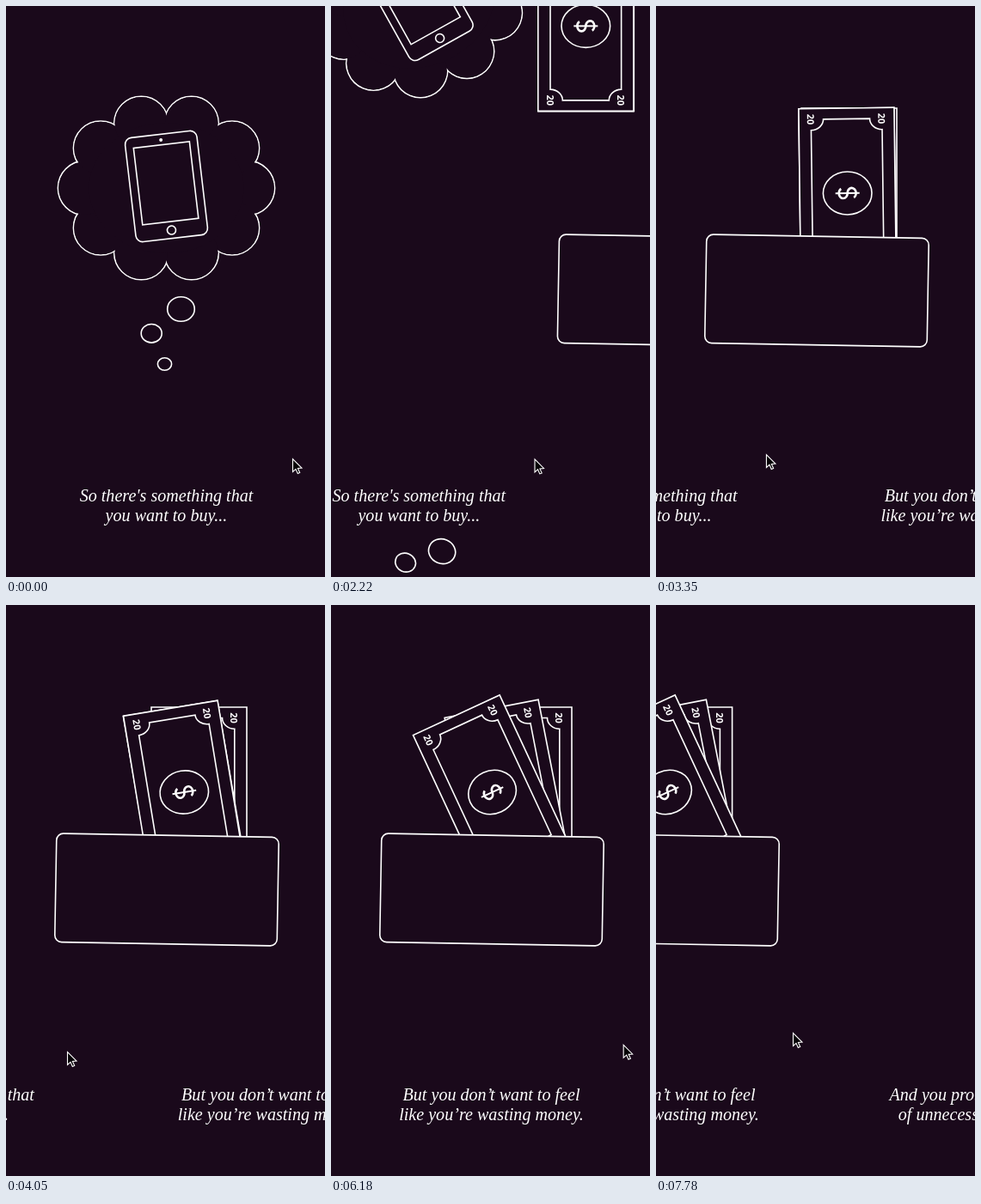
Animation, 371 px wide and 665 px high, one loop 8 s. Source, as an HTML page with a canvas:

```html
<!DOCTYPE html>
<html lang="en">
<head>
<meta charset="utf-8">
<title>Onboarding swipe</title>
<style>
html, body { margin: 0; width: 100%; height: 100%; overflow: hidden; background: #1a091b; }
canvas { display: block; width: 371px; height: 665px; }
</style>
</head>
<body>
<canvas id="stage"></canvas>
<script>
const W = 371, H = 665, LOOP = 8000, PAGE = 375, HALF = PAGE / 2, MID = 186.5;
const BG = '#1a091b', INK = '#fff', TAU = Math.PI * 2, DEG = Math.PI / 180;
const SPIN = 0.267; // degrees per scrolled pixel
const RELEASE = 4045, SNAP = 470, SECOND_DRAG = 6160;

const canvas = document.getElementById('stage');
const dpr = window.devicePixelRatio || 1;
canvas.width = W * dpr;
canvas.height = H * dpr;
const c = canvas.getContext('2d');

// Pointer strokes; the pointer rests between them
const REST = { x: 333, y: 527 };
const STROKES = [
  { from: 930, to: 1610, x: 269.6, y: 528 },
  { from: 1610, to: 2600, x: 216, y: 527 },
  { from: 2670, to: 3350, x: 128, y: 522 },
  { from: 3350, to: 4030, x: 71, y: 520 },
  { from: 4700, to: 5600, x: 342, y: 512 },
  { from: 6160, to: 6800, x: 271, y: 507 },
  { from: 6920, to: 7780, x: 159, y: 498 }
];

const PAGES = [
  ["So there's something that", 'you want to buy...'],
  ['But you don\u2019t want to feel', 'like you\u2019re wasting money.'],
  ['And you probably have a ton', 'of unnecessary expenses...']
];

const ARROW = new Path2D('M0 0V15L3.5 11.8L5.8 17L8.2 16L5.9 11L10.5 10.6Z');

const clamp = (v, a, b) => Math.min(b, Math.max(a, v));
const mix = (a, b, u) => a + (b - a) * u;
const smooth = u => u * u * (3 - 2 * u);

function pointer(t) {
  let { x, y } = REST;
  for (const s of STROKES) {
    const u = clamp((t - s.from) / (s.to - s.from), 0, 1);
    x = mix(x, s.x, s.x > x ? smooth(u) : u);
    y = mix(y, s.y, u);
  }
  return { x, y };
}

// Drags follow the pointer past a small threshold, then the page snaps
function scrollAt(t) {
  if (t >= SECOND_DRAG) return PAGE + Math.max(0, 333 - pointer(t).x);
  const drag = Math.max(0, 320.7 - pointer(Math.min(t, RELEASE)).x);
  const u = clamp((t - RELEASE) / SNAP, 0, 1);
  return mix(drag, PAGE, 1 - (1 - u) ** 3);
}

function at(x, y, angle, draw) {
  c.save();
  c.translate(x, y);
  c.rotate(angle * DEG);
  draw();
  c.restore();
}

function oval(x, y, rx, ry = rx) {
  c.beginPath();
  c.ellipse(x, y, rx, ry, 0, 0, TAU);
}

function box(w, h, r, y = 0) {
  c.beginPath();
  c.roundRect(-w / 2, y - h / 2, w, h, r);
}

function lobes(r) {
  for (let a = 0; a < 360; a += 36) {
    oval(94.5 * Math.cos(a * DEG), 79 * Math.sin(a * DEG), r);
    r > 31 ? c.stroke() : c.fill();
  }
}

function phone() {
  box(84, 122, 8);
  c.stroke();
  box(65.5, 90, 0, -3.6);
  c.stroke();
  oval(0, 51.4, 5);
  c.stroke();
  c.fillStyle = INK;
  oval(0, -54.4, 2);
  c.fill();
}

function cloud(s) {
  at(MID - s, 212 - 0.0307 * s * s, -SPIN * s, () => {
    lobes(31.6);
    lobes(30.8);
    oval(0, 0, 90, 76);
    c.fill();
    at(0, -2, -6.7, phone);
  });
}

function bubbles(s) {
  const bubble = (x, y, r) => {
    oval(x, y, r, r * 0.9);
    c.stroke();
  };
  at(MID - s, 382 + 3.248 * s, SPIN * s, () => {
    bubble(17, -29, 15.8);
    bubble(-17.3, -0.7, 12);
    bubble(-2, 35, 8.1);
  });
}

function dollar() {
  c.lineWidth = 2.6;
  c.beginPath();
  c.ellipse(0, -5, 6, 5, 0, -0.5, Math.PI / 2, true);
  c.ellipse(0, 5, 6, 5, 0, -Math.PI / 2, Math.PI - 0.5);
  c.stroke();
  c.lineWidth = 2;
  c.beginPath();
  c.moveTo(0, -14);
  c.lineTo(0, 14);
  c.stroke();
}

function bill(x, y, angle) {
  const corner = i => [i % 3 ? 41.3 : -41.3, i < 2 ? -86.5 : 86.5];
  at(x, y, -angle, () => {
    box(111, 198, 0);
    c.fill();
    c.stroke();
    c.beginPath();
    for (let i = 0; i < 4; i++) {
      c.ellipse(...corner(i), 14.3, 12.7, 0, (i + 1) * Math.PI / 2, i * Math.PI / 2, true);
    }
    c.closePath();
    c.stroke();
    oval(0, 0, 28.3, 25);
    c.stroke();
    c.fillStyle = INK;
    c.font = 'bold 11px "Open Sans", "Noto Sans", sans-serif';
    for (let i = 0; i < 4; i++) at(...corner(i), 90, () => c.fillText('20', 0, 4.5));
    at(0, 0, 90, dollar);
  });
}

// Bills drop in together, fan out, then close up while leaving
function bills(s) {
  const enter = Math.max(0, HALF - s), exit = Math.max(0, s - PAGE);
  const fan = clamp(s - HALF, 0, HALF), near = Math.min(fan, 76), far = fan - near;
  const x = 224 + 0.7 * enter, y = 218 - 1.884 * enter;
  bill(x + 0.5 - 1.1 * exit, y, 0);
  bill(x - 0.243 * near - 1.05 * exit, y, 0.145 * near);
  bill(x - 0.249 * near - 0.157 * far - exit, y, 0.139 * near + 0.129 * far);
}

function wallet(s) {
  const x = 187 + 2 * Math.max(0, HALF - s) - Math.max(0, s - PAGE);
  at(x, 331.5, 1, () => {
    box(258.5, 126.5, 8);
    c.fill();
    c.stroke();
  });
}

function captions(s) {
  c.fillStyle = INK;
  c.font = 'italic 20.1px "Liberation Serif", "Times New Roman", serif';
  PAGES.forEach((lines, i) => lines.forEach((line, j) => {
    c.fillText(line, MID + i * PAGE - s, 577 + 23 * j);
  }));
}

function cursor({ x, y }) {
  at(x + 0.5, y + 0.5, 0, () => {
    c.fillStyle = '#050205';
    c.fill(ARROW);
    c.lineWidth = 1.1;
    c.stroke(ARROW);
  });
}

function render(t) {
  const s = scrollAt(t);
  c.setTransform(dpr, 0, 0, dpr, 0, 0);
  c.fillStyle = BG;
  c.strokeStyle = INK;
  c.lineWidth = 1.6;
  c.textAlign = 'center';
  c.fillRect(0, 0, W, H);
  if (s < HALF) {
    cloud(s);
    bubbles(s);
  }
  bills(s);
  wallet(s);
  captions(s);
  cursor(pointer(t));
}

const start = performance.now();
function tick() {
  render((performance.now() - start) % LOOP);
  requestAnimationFrame(tick);
}
tick();
</script>
</body>
</html>
```
